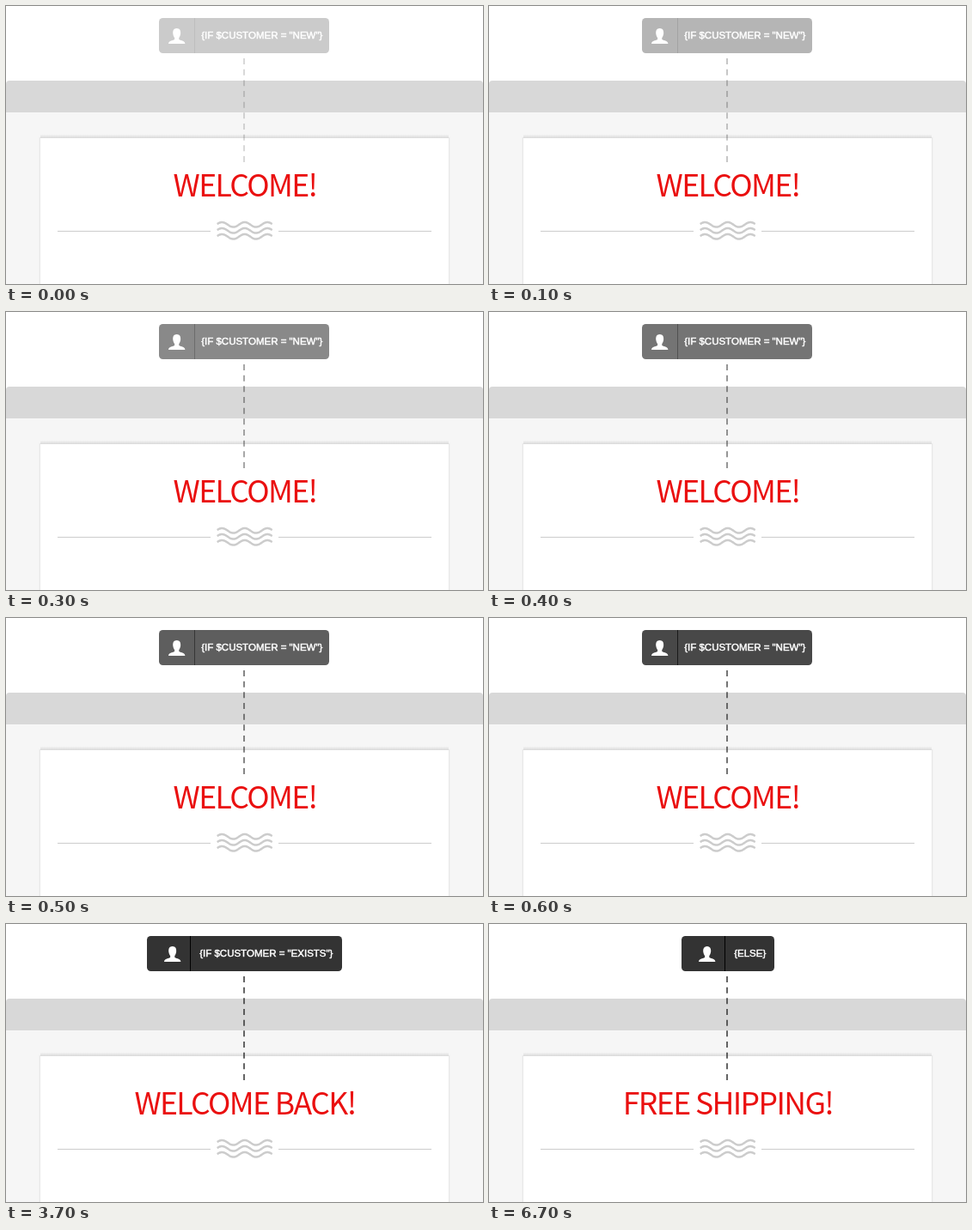
Animation, 555 px wide and 324 px high, one loop 9700 ms. Source, as an HTML page:

```html
<!DOCTYPE html>
<html lang="en">
<head>
<meta charset="utf-8">
<title>Conditional greeting</title>
<style>
  html, body { margin: 0; height: 100%; overflow: hidden; background: #fff; }
  svg { display: block; }
  #label { font: 11.5px "Liberation Sans", Arial, sans-serif; fill: #fff; stroke: #fff; stroke-width: .5px; }
  #title { font: 35.6px "Noto Sans CJK SC", "Noto Sans CJK JP", "Open Sans", sans-serif; letter-spacing: -1.6px; fill: #ea1010; text-anchor: middle; }
</style>
</head>
<body>
<svg width="555" height="324" viewBox="0 0 555 324">
  <defs>
    <linearGradient id="edge" x2="0" y2="1">
      <stop offset="0" stop-color="#f3f3f3"/>
      <stop offset="1" stop-color="#d9d9d9"/>
    </linearGradient>
  </defs>
  <path d="M0 124V91a4 4 0 0 1 4-4H551a4 4 0 0 1 4 4V124z" fill="#d8d8d8"/>
  <path d="M0 124H555V324H0z" fill="#f6f6f6"/>
  <path d="M38 153H517V324H38z" fill="#f1f1f1"/>
  <path d="M39 153H516V324H39z" fill="#e9e9e9"/>
  <path d="M40 150H515V154H40z" fill="url(#edge)"/>
  <path d="M40 154H515V324H40z" fill="#fff"/>
  <path d="M60 262.5H238M317 262.5H495" stroke="#ccc"/>
  <g id="waves" fill="none" stroke="#ccc" stroke-width="2.5"></g>

  <g id="rule">
    <rect id="box" y="14" height="41" rx="4.5" fill="#333"/>
    <g id="parts">
      <path d="M.5 14V55" stroke="#000"/>
      <path d="M-20.300 26c3.500 0 4.900 2.800 4.400 6.500c-.4 2.500-1 3.500-1.800 4.500v2c2.600 1.300 7.100 1.800 7.100 5H-30c0-3.200 4.500-3.700 7.100-5v-2c-.8-1-1.400-2-1.800-4.500c-.5-3.700 .9-6.500 4.400-6.500z" fill="#fff"/>
    </g>
    <text id="label" y="38"></text>
    <path d="M277 61V182" stroke="#333" stroke-width="1.5" stroke-dasharray="7 5.667"/>
  </g>
  <text id="title" x="278" y="222"></text>
</svg>
<script>
  const LOOP = 9700;
  const $ = id => document.getElementById(id);

  const scenes = [
    { until: 3700, box: [178, 376], divider: 219, textX: 227.2, label: '{IF $CUSTOMER = "NEW"}', title: 'WELCOME!' },
    { until: 6700, box: [164, 391], divider: 214, textX: 225.2, label: '{IF $CUSTOMER = "EXISTS"}', title: 'WELCOME BACK!' },
    { until: LOOP, box: [224, 332], divider: 274, textX: 285.2, label: '{ELSE}', title: 'FREE SHIPPING!' }
  ];

  function wave(y) {
    let d = '';
    for (let x = 245.7; x < 310; x++)
      d += `${d ? 'L' : 'M'}${x} ${y - 2.8 * Math.cos((x - 277.7) / 26.4 * 2 * Math.PI)}`;
    return `<path d="${d}"/>`;
  }
  $('waves').innerHTML = [254.8, 261.8, 268.8].map(wave).join('');

  let shown;
  function show(scene) {
    const [left, right] = scene.box;
    $('box').setAttribute('x', left);
    $('box').setAttribute('width', right - left);
    $('parts').setAttribute('transform', `translate(${scene.divider})`);
    $('label').setAttribute('x', scene.textX);
    $('label').textContent = scene.label;
    $('title').textContent = scene.title;
    shown = scene;
  }

  function draw(now) {
    const t = now % LOOP;
    const scene = scenes.find(s => t < s.until);
    if (scene !== shown) show(scene);
    // Fade in by seven even steps
    const step = Math.min(7, Math.floor(t / 100));
    $('rule').setAttribute('opacity', 0.25 + 0.75 * step / 7);
    requestAnimationFrame(draw);
  }
  draw(performance.now());
</script>
</body>
</html>
```
